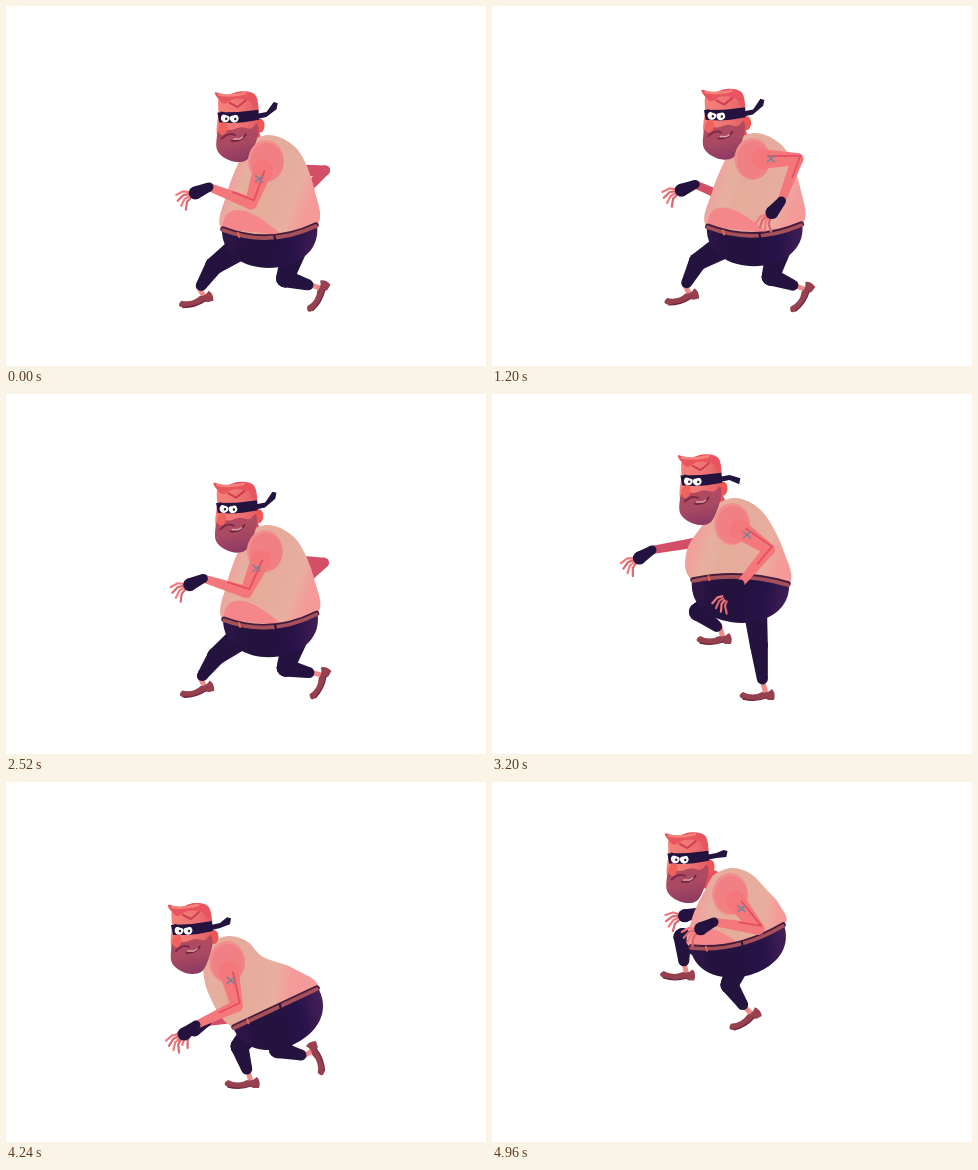
An HTML page with a canvas for the animation above (5000 ms loop, 480 px wide and 360 px high).

```html
<!DOCTYPE html>
<html lang="en">
<head>
<meta charset="utf-8">
<title>Sneaking thief</title>
<style>
html, body { margin: 0; width: 100%; height: 100%; overflow: hidden; background: #fff; }
canvas { display: block; }
</style>
</head>
<body>
<canvas id="stage" width="480" height="360"></canvas>
<script>
const ctx = document.getElementById('stage').getContext('2d');
const LOOP = 5000, FRAME = 40, STEP = 1240, STRIDE = 2 * STEP;
const SKIN = '#f4777c', RED = '#e5505f', DARK = '#24123f', SHOE = '#97414f';

const clamp = (v, lo, hi) => Math.min(hi, Math.max(lo, v));
const ease = (t, from, to) => { const u = clamp((t - from) / (to - from), 0, 1); return u * u * (3 - 2 * u); };
const mix = (a, b, k) => a.map((v, i) => v + (b[i] - v) * k);

// Smooth repeating motion through a few keys: time, then values
function track(period, keys) {
  const n = keys.length;
  const key = i => {
    const lap = Math.floor(i / n), [t, ...v] = keys[i - lap * n];
    return { t: t + lap * period, v };
  };
  return time => {
    const t = time % period;
    let i = n - 1;
    while (keys[i][0] > t) i--;
    const [a, b, c, d] = [key(i - 1), key(i), key(i + 1), key(i + 2)];
    const span = c.t - b.t, u = (t - b.t) / span;
    return b.v.map((p, j) => {
      const q = c.v[j];
      const m = (q - a.v[j]) / (c.t - a.t) * span, o = (d.v[j] - p) / (d.t - b.t) * span;
      return p + u * (m + u * (3 * (q - p) - 2 * m - o + u * (2 * (p - q) + m + o)));
    });
  };
}

// Stride, crouch, rise, stand: head x, y, tilt; shoulder; belt front; belt back; belt sag
const trunkAt = track(STEP, [
  [0, 230, 121, .03, 260, 155, 216, 223, 311, 219, 10],
  [520, 184, 157, 0, 221, 180, 227, 245, 312, 206, 0],
  [600, 182, 124, -.12, 228, 157, 222, 224, 309, 205, -4],
  [720, 207, 96, .03, 240, 130, 200, 186, 297, 190, -6]]);
// Wrist, measured from the shoulder
const wristAt = track(STRIDE, [
  [0, -57, 26], [160, -82, 36], [520, -20, 60], [600, 8, 65], [720, 8, 60],
  [1240, 28, 42], [1760, -31, 63], [1840, -63, 33], [1960, -80, 26]]);
// Ankle and turn of the foot
const footAt = track(STRIDE, [
  [0, 193, 283, -.25], [520, 242, 291, 0], [720, 271, 291, 0],
  [1240, 306, 280, -1], [1760, 299, 274, -1.88], [1840, 268, 265, -1.5], [1960, 228, 235, 0]]);

const LEAP = {
  trunk: [194, 86, .03, 238, 112, 198, 165, 292, 143, 8],
  near: [-16, 28], far: [-31, 18], footA: [192, 183, .05], footB: [253, 226, -.5]
};

function poseAt(time) {
  const t = Math.min(time, STRIDE + STEP + 720);
  const arms = ease(time, 4270, 4480), rise = ease(time, 4560, 4960), push = ease(time, 4760, 4960);
  const trunk = mix(trunkAt(t), LEAP.trunk, rise);
  const dip = 16 * Math.sin(Math.PI * clamp((time - 4520) / 400, 0, 1));
  for (const i of [1, 4, 6, 8]) trunk[i] += dip;
  return {
    trunk,
    near: mix(wristAt(t), LEAP.near, arms), far: mix(wristAt(t + STEP), LEAP.far, arms),
    footA: mix(footAt(t), LEAP.footA, rise), footB: mix(footAt(t + STEP), LEAP.footB, push)
  };
}

// Elbow or knee between two ends; side picks the way it bends
function joint([x, y], [u, v], first, second, side) {
  const d = Math.hypot(u - x, v - y), k = Math.max(1, d / (first + second));
  const a = first * k, b = second * k, dx = (u - x) / d, dy = (v - y) / d;
  const along = (d * d + a * a - b * b) / (2 * d);
  const out = side * Math.sqrt(Math.max(0, a * a - along * along));
  return [x + dx * along + dy * out, y + dy * along - dx * out];
}

function fill(style) { ctx.fillStyle = style; ctx.fill(); }
function stroke(style, width) { ctx.strokeStyle = style; ctx.lineWidth = width; ctx.stroke(); }
function oval(x, y, rx, ry, style, turn = 0) {
  ctx.beginPath(); ctx.ellipse(x, y, rx, ry, turn, 0, 7); fill(style);
}
function shade(x0, y0, x1, y1, ...colors) {
  const g = ctx.createLinearGradient(x0, y0, x1, y1);
  colors.forEach((c, i) => g.addColorStop(i / (colors.length - 1), c));
  return g;
}
function line(points, style, width) {
  ctx.beginPath(); points.forEach(p => ctx.lineTo(...p)); stroke(style, width);
}
function curve(x, y, cx, cy, u, v, style, width) {
  ctx.beginPath(); ctx.moveTo(x, y); ctx.quadraticCurveTo(cx, cy, u, v); stroke(style, width);
}
function shape(points, style) {
  ctx.beginPath(); points.forEach(p => ctx.lineTo(...p)); ctx.closePath(); fill(style);
}
// Closed smooth curve through the points
function blob(points, style) {
  const n = points.length, at = i => points[(i + n) % n];
  ctx.beginPath(); ctx.moveTo(...points[0]);
  for (let i = 0; i < n; i++) {
    const [a, b, c, d] = [at(i - 1), at(i), at(i + 1), at(i + 2)];
    ctx.bezierCurveTo(b[0] + (c[0] - a[0]) / 6, b[1] + (c[1] - a[1]) / 6,
      c[0] - (d[0] - b[0]) / 6, c[1] - (d[1] - b[1]) / 6, ...c);
  }
  fill(style);
}
function taper([x, y], [u, v], r, s, style) {
  const a = Math.atan2(v - y, u - x) + Math.PI / 2, c = Math.cos(a), d = Math.sin(a);
  shape([[x + c * r, y + d * r], [u + c * s, v + d * s], [u - c * s, v - d * s], [x - c * r, y - d * r]], style);
  oval(x, y, r, r, style); oval(u, v, s, s, style);
}

function drawArm(from, wrist, near) {
  const elbow = joint(from, wrist, 45, 45, 1), tone = near ? SKIN : '#d24f66';
  taper(mix(from, elbow, .2), elbow, near ? 10 : 7, near ? 6 : 5, tone);
  taper(elbow, wrist, near ? 6 : 5, 4, tone);
  if (near) line([mix(from, elbow, .3), elbow, mix(elbow, wrist, .5)].map(([x, y]) => [x + 3, y - 3]), '#e4505f', 1.8);

  // The hand hangs forward and down whatever the forearm does
  const fore = (Math.atan2(wrist[1] - elbow[1], wrist[0] - elbow[0]) + 2 * Math.PI) % (2 * Math.PI);
  const a = fore + (2.4 - fore) * .7;
  const reach = (p, angle, len) => [p[0] + len * Math.cos(angle), p[1] + len * Math.sin(angle)];
  const palm = reach(wrist, a, 15);
  for (let i = 0; i < 4; i++) {
    const b = a + (i - 1.3) * .32, knuckle = reach(palm, b, 12);
    line([palm, knuckle, reach(knuckle, b - .6, 8)], i % 2 ? SKIN : '#d9686f', 2.2);
  }
  taper(wrist, palm, 4.5, 6.5, DARK);
  return elbow;
}

function drawLeg([mx, my], [ax, ay, turn]) {
  const hip = [mx + clamp((ax - mx) * .6, -28, 26), my], knee = joint(hip, [ax, ay], 34, 28, -1);
  ctx.save();
  ctx.translate(ax, ay); ctx.rotate(turn);
  line([[0, -2], [3, 9]], '#ef8a88', 5);
  ctx.beginPath(); ctx.moveTo(-1, 7);
  ctx.quadraticCurveTo(-10, 12, -20, 7);
  ctx.quadraticCurveTo(-27, 11, -20, 14);
  ctx.quadraticCurveTo(-8, 17, 2, 13);
  ctx.lineTo(5, 15); ctx.lineTo(11, 15); ctx.quadraticCurveTo(13, 8, 9, 4);
  ctx.quadraticCurveTo(4, 9, -1, 7); fill(SHOE);
  curve(-20, 14, -8, 17, 3, 13, '#6b2640', 1.3);
  ctx.restore();
  taper(hip, knee, 13, 9, DARK);
  taper(knee, mix([ax, ay], knee, .15), 9, 5.5, DARK);
}

function drawTrunk(sx, sy, lx, ly, rx, ry, sag, down) {
  const bx = sx + 36, by = sy - 5, span = Math.hypot(rx - bx, ry - by);
  const back = [(bx + rx) / 2 + (ry - by) / span * 5, (by + ry) / 2 - (rx - bx) / span * 5];
  blob([[lx, ly], [(lx + sx - 26) / 2 - 9 + sag / 2, (ly + sy - 4) / 2], [sx - 24, sy - 6], [sx - 15, sy - 20], [sx + 3, sy - 26],
    [sx + 21, sy - 20], [bx, by], back, [rx, ry], [(lx + rx) / 2, (ly + ry) / 2 + 10]],
    shade(sx - 30, sy, ...back, '#f0a19c', '#e6b0a0', '#e5ac9c', '#e5ab9b', '#e6ad9e', '#e9aea0', '#f49a99'));
  const mid = [(lx + rx) / 2, (ly + ry) / 2 + sag * 2];
  if (sag > 4) {
    ctx.globalAlpha = Math.min(1, (sag - 4) / 3);
    ctx.beginPath(); ctx.moveTo(lx, ly);
    ctx.bezierCurveTo(lx + 2, ly - 28, lx + 26, ly - 24, lx + 60, ly + 6); fill('#f5868a');
    ctx.globalAlpha = 1;
  }
  ctx.beginPath(); ctx.moveTo(lx, ly);
  ctx.bezierCurveTo(lx - 4 + down[0] * 55, ly + down[1] * 55, rx + 5 + down[0] * 54, ry + down[1] * 54, rx, ry);
  ctx.quadraticCurveTo(...mid, lx, ly);
  fill(shade(lx, ly, rx + 3, ry + 15, '#2f1747', DARK, DARK, '#28134a', '#432056'));
  curve(lx + 1, ly, mid[0], mid[1], rx - 1, ry, '#461c3d', 5.5);
  curve(lx + 1, ly + 1, mid[0], mid[1] + 1, rx - 1, ry + 1, '#a6505a', 3.6);
  for (const u of [.17, .55]) {
    const [x, y] = mix(mix([lx, ly], mid, u), mix(mid, [rx, ry], u), u);
    line([[x, y - 1], [x + 1, y + 3]], u < .3 ? '#e5694f' : DARK, 2);
  }
}

function drawHead(x, y, tilt, lift) {
  ctx.save();
  ctx.translate(x, y); ctx.rotate(tilt);
  const tail = -17 - lift;
  shape([[21, -14], [30, -16], [37, tail - 3], [41, tail - 2], [40, tail + 4], [30, -11], [22, -9]], DARK);
  blob([[-18, -14], [-17, -29], [0, -32], [17, -32], [21, -14], [23, 4], [10, 16], [-17, 12]],
    shade(-20, 0, 24, 0, '#f58279', '#f07673', '#e35b66'));
  oval(24, -2, 4.5, 7, '#ee5754');
  blob([[-16, 3], [-19, 12], [-18, 24], [-9, 32], [3, 35], [14, 30], [22, 8], [21, -4], [15, 1], [5, 0], [-5, 3]],
    shade(-8, 0, 0, 35, '#b44b5f', '#a94963', '#8e3a62'));
  blob([[-22, -34], [-10, -32], [4, -36], [18, -33], [22, -18], [17, -20], [12, -27], [-2, -28], [-12, -23], [-18, -27]], '#e9555e');
  curve(-18, -32, -6, -30, 8, -34, '#f5837c', 2.5);
  line([[9, -27], [1, -20], [-7, -24]], '#cd3f53', 2);
  shape([[-19, -14], [2, -15], [22, -18], [23, -8], [8, -5], [-2, -4], [-17, -4]], DARK);
  for (const ex of [-11, -2]) {
    oval(ex, -8.5, 4.4, 4.2, '#fff');
    oval(ex + 1, -8, 1.2, 1.3, '#222');
  }
  line([[-15, -14], [-7, -11.5], [3, -14]], DARK, 2);
  oval(-13, 2, 4.5, 6.5, '#f0625e', .2);
  curve(-14, 12, -7, 5, -1, 8, '#7c2a48', 2);
  curve(-4, 14, 6, 15, 10, 7, '#64233f', 1.5);
  line([[-2, 12], [4, 12], [7, 10]], '#dba0a8', 1.5);
  ctx.restore();
}

function draw(time) {
  const pose = poseAt(time);
  const [hx, hy, tilt, sx, sy, lx, ly, rx, ry, sag] = pose.trunk;
  const width = Math.hypot(rx - lx, ry - ly), down = [(ly - ry) / width, (rx - lx) / width];
  const hip = [(lx + rx) / 2 + down[0] * 14, (ly + ry) / 2 + down[1] * 14 + Math.max(0, sag) / 2];
  const fall = time ? hy - poseAt(time - FRAME).trunk[1] : 2;
  const wrist = ([x, y]) => [sx + x, sy + y];

  ctx.clearRect(0, 0, 480, 360);
  ctx.lineCap = ctx.lineJoin = 'round';
  drawArm([sx + 14, sy + 10], wrist(pose.far), false);
  drawLeg(hip, pose.footB);
  drawLeg(hip, pose.footA);
  taper([hx + 12, hy + 6], [sx - 12, sy - 11], 11, 10, RED);
  drawTrunk(sx, sy, lx, ly, rx, ry, sag, down);
  drawHead(hx, hy, tilt, clamp(fall * 3, -6, 7));

  oval(sx, sy, 18, 21, '#f28f8d');
  oval(sx + 1, sy + 1, 16.5, 19, '#f08084');
  const elbow = drawArm([sx, sy], wrist(pose.near), true);
  const [ix, iy] = mix([sx, sy], elbow, .42);
  for (const s of [-1, 1]) line([[ix - 4, iy - 3 * s], [ix + 3, iy + 3 * s]], '#7b8397', 1.6);
}

function tick() {
  draw(Math.floor(performance.now() % LOOP / FRAME) * FRAME);
  requestAnimationFrame(tick);
}
tick();
</script>
</body>
</html>
```
